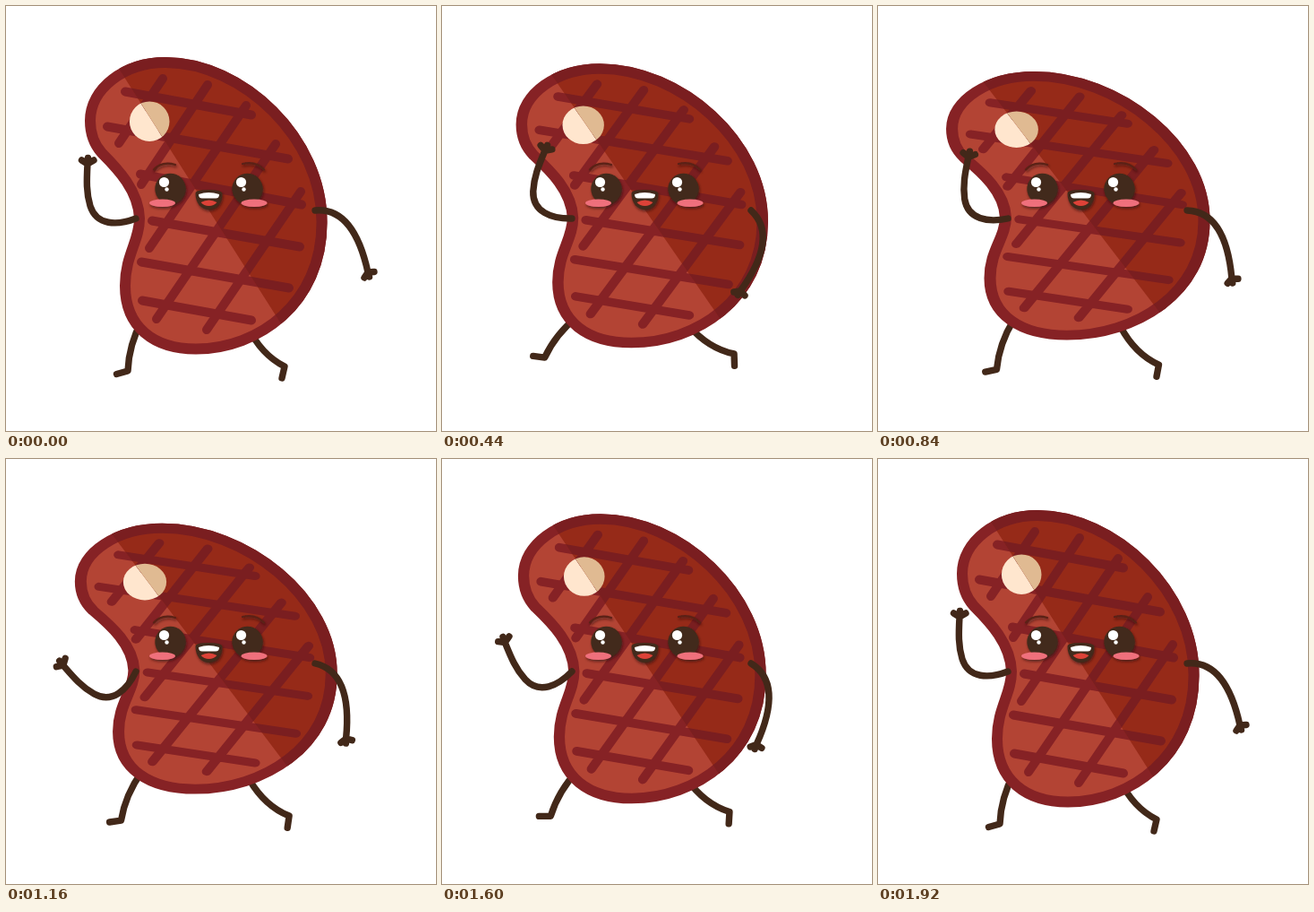
Animation, 480 px wide and 474 px high, one loop 1.96 s. Source, as an HTML page:

```html
<!DOCTYPE html>
<html lang="en">
<head>
<meta charset="utf-8">
<title>Dancing steak</title>
<style>
  html, body { margin: 0; width: 100%; height: 100%; overflow: hidden; background: #fff; }
  svg { display: block; width: 100%; height: 100%; }
  .limb { fill: none; stroke: #422819; stroke-width: 7.4; stroke-linecap: round; stroke-linejoin: round; }
  .grill { fill: none; stroke-width: 10; stroke-linecap: round; }
  .brow { fill: none; stroke: #5a2016; stroke-width: 2.2; stroke-linecap: round; }
</style>
</head>
<body>
<svg viewBox="0 0 480 474">
  <defs>
    <path id="outline" d="M178 63C264 63 353.500 148 352.500 242C352.500 331 282 382.500 212 382.500C165 382.500 133 358 133 312C133 278 149 262 149 237C148 206 125 182 107 164C98 154 94 143 94 128C94 92 132 63 178 63Z"/>
    <path id="grill" d="M133 95.500L274 121.500M113 134.500L315 170.500M150 187.500L330 221.500M163 239.500L328 268.500M151 285.500L316 314.500M152 328.500L274 350.500
      M175 81L126 153M225 88L151 199M268 111L160 270M301 154L168 349M329 207L224 361"/>
    <clipPath id="shadeSide"><path d="M107 40H400V400H336Z"/></clipPath>
    <filter id="soft" x="-10%" y="-20%" width="120%" height="150%">
      <feDropShadow dx="1" dy="2" stdDeviation="1.8" flood-color="#2a120c" flood-opacity=".65"/>
    </filter>
    <g id="eye">
      <circle r="17.2" fill="#432a1a"/>
      <circle cx="-7" cy="-7.5" r="5.6" fill="#fff"/>
      <circle cx="-4" cy="0.5" r="2.2" fill="#fff"/>
    </g>
  </defs>

  <g id="leftLeg" class="limb"><path d="M152 350Q137 378 136 407L123.500 410.500"/></g>
  <g id="rightLeg" class="limb"><path d="M270 358Q285 389 311 402L308 415"/></g>

  <g id="body"></g>

  <g filter="url(#soft)">
    <path class="brow" d="M165 182.500Q174 172.500 189 177"/>
    <path class="brow" d="M264 176Q279 172.500 288 182.500"/>
    <use href="#eye" x="183.500" y="204"/>
    <use href="#eye" x="269.500" y="204"/>
    <ellipse cx="174.500" cy="219.800" rx="14.500" ry="4.200" fill="#ef707c"/>
    <ellipse cx="277" cy="219.800" rx="14.500" ry="4.200" fill="#ef707c"/>
    <path d="M211.500 209Q211.500 205 226 205T241.500 209C241.500 220 235 227 226.500 227S211.500 220 211.500 209Z" fill="#432a1a"/>
    <path d="M215 210Q226 206 238 210Q238 214.500 234 214.500H219Q215 214.500 215 210Z" fill="#fff"/>
    <path d="M217.500 219Q226.500 214 235.500 219Q232 223 226.500 223T217.500 219Z" fill="#dd4238"/>
  </g>

  <g id="leftArm" class="limb"><path d="M145 237C124 245 101 245 94 223C89.500 208 90 195 91 176L84.500 172M91 176L91.500 169.500M91 176L98 172"/></g>
  <g id="rightArm" class="limb"><path d="M345 228C378 225 395 256 404 297L411 296.500M404 297L400 303M404 297L405.500 302"/></g>
</svg>
<script>
const FRAME = 40, LOOP = 1960, CYCLE = 1920;
const byId = id => document.getElementById(id);
const ease = x => (1 - Math.cos(Math.PI * x)) / 2;

const layer = (fill, line, shine, attrs = '') => `<g ${attrs}>
  <use href="#outline" fill="${fill}" stroke="${line}" stroke-width="12"/>
  <use href="#grill" class="grill" stroke="${line}"/>
  <circle cx="160.200" cy="128.700" r="22.300" fill="${shine}"/></g>`;

byId('body').innerHTML =
  layer('#b34434', '#862225', '#ffe6ce') +
  layer('#962a18', '#7a1e20', '#e0ba92', 'clip-path="url(#shadeSide)"');

const rotate = (id, angle, x, y) =>
  byId(id).setAttribute('transform', `rotate(${angle} ${x} ${y})`);

// Eased values through evenly spaced keys over one cycle
function keyed(t, keys) {
  const pos = t / CYCLE * (keys.length - 1);
  const i = Math.min(Math.floor(pos), keys.length - 2);
  return keys[i] + (keys[i + 1] - keys[i]) * ease(pos - i);
}

function draw(t) {
  const squash = keyed(t, [0, 1, 0]);
  byId('body').setAttribute('transform',
    `translate(223.2 222.5) scale(${1 + 0.092 * squash} ${1 - 0.1 * squash}) translate(-223.2 -222.5)`);
  rotate('leftLeg', keyed(t, [0, 23.4, 0, 20, 0]), 162, 347);
  rotate('rightLeg', keyed(t, [0, -15.3, 0, -12.7, 0]), 265.4, 338);
  rotate('leftArm', keyed(t, [0, 25.5, -50, 0]), 145, 237);
  rotate('rightArm', keyed(t, [0, 49, 0, 49, 0]), 345, 228);
}

const start = performance.now();
function tick() {
  const t = (performance.now() - start) % LOOP;
  draw(Math.floor(t / FRAME) * FRAME);
  requestAnimationFrame(tick);
}
tick();
</script>
</body>
</html>
```
